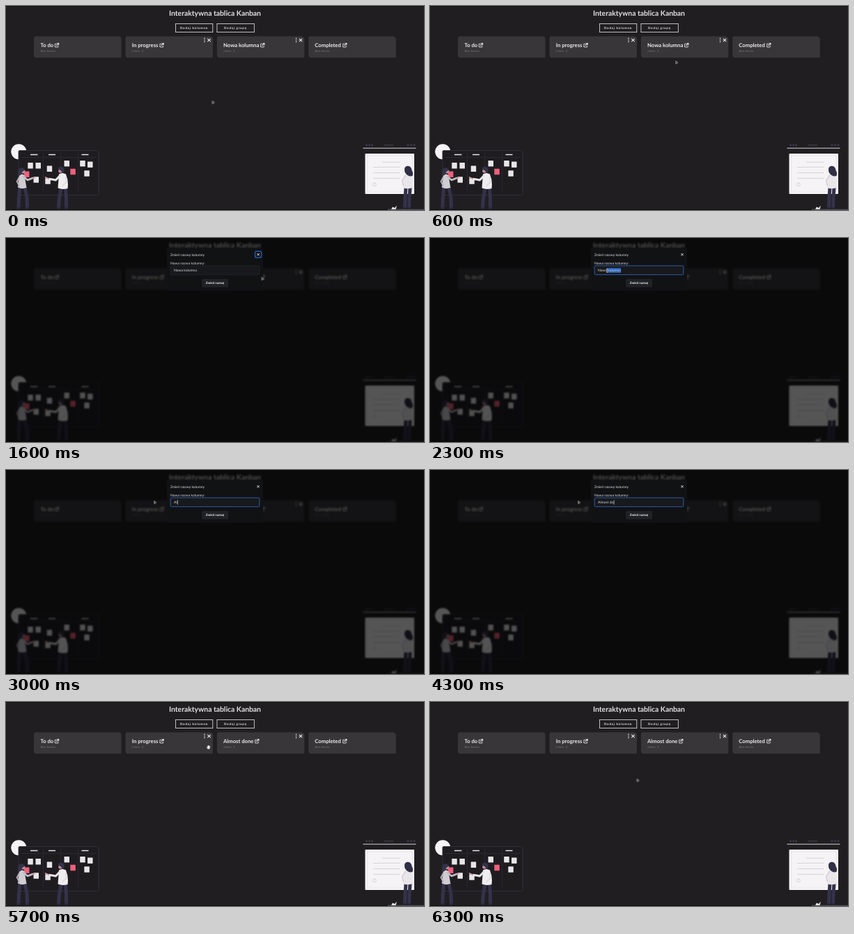
These frames come from a looping animation (600 px wide and 293 px high, 7 s). An HTML page:

```html
<!DOCTYPE html>
<html lang="pl">
<head>
<meta charset="utf-8">
<title>Tablica Kanban</title>
<style>
  html, body { margin: 0; width: 100%; height: 100%; overflow: hidden; background: #201e21; }
  svg { display: block; width: 100vw; height: 100vh; }
  text { font-family: Lato, "Open Sans", sans-serif; text-rendering: geometricPrecision; white-space: pre; }
  .title { font-size: 10.35px; font-weight: 700; fill: #e4e2e4; text-anchor: middle; }
  .add { font-size: 4.4px; font-weight: 700; letter-spacing: .8px; fill: #eee; }
  .name { font-size: 7.7px; font-weight: 700; fill: #eceaec; }
  .limit { font-size: 4px; font-style: italic; letter-spacing: .5px; fill: #858286; }
  .field { font-size: 5.03px; fill: #dcdde0; }
  .go { font-size: 4.5px; font-weight: 700; fill: #f4f4f5; text-anchor: middle; }

  .show { animation: 7s step-end infinite; visibility: hidden; }
  #page { animation: soften 7s step-end infinite; }
  #modal { animation-name: modal; }
  #ring { animation-name: ring; }
  #focus { animation-name: focus; }
  #pick { animation: pick 7s infinite; transform-origin: 274px 0; }
  #before { animation-name: before; }
  #after { animation-name: after; }
  #mouse { animation: path 7s infinite; }
  #arrow { animation-name: arrow; }
  #beam { animation-name: beam; }
  #hand { animation-name: hand; }
  #grab { animation-name: grab; }

  @keyframes soften { 0%, 81.42% { filter: none; } 22.85% { filter: blur(.8px); } }
  @keyframes modal { 0%, 81.42% { visibility: hidden; } 22.85% { visibility: visible; } }
  @keyframes ring { 0%, 30% { visibility: hidden; } 22.85% { visibility: visible; } }
  @keyframes focus { 0%, 81.42% { visibility: hidden; } 30% { visibility: visible; } }
  @keyframes before { 0% { visibility: visible; } 81.42%, 100% { visibility: hidden; } }
  @keyframes after { 0% { visibility: hidden; } 81.42%, 100% { visibility: visible; } }
  @keyframes pick {
    0% { transform: scaleX(0); animation-timing-function: step-end; }
    30% { transform: scaleX(0); animation-timing-function: steps(5, start); }
    37.14% { transform: scaleX(1); animation-timing-function: step-end; }
    41.42%, 100% { transform: scaleX(0); animation-timing-function: step-end; }
  }
  @keyframes path {
    0% { transform: translate(297.5px, 138.5px); animation-timing-function: step-end; }
    1.42% { transform: translate(297.5px, 138.5px); animation-timing-function: steps(8, start); }
    12.85% { transform: translate(373px, 62px); animation-timing-function: steps(5, start); }
    20% { transform: translate(370px, 59.5px); animation-timing-function: step-end; }
    22.85% { transform: translate(368.5px, 58.5px); animation-timing-function: step-end; }
    24.28% { transform: translate(368.5px, 58.5px); animation-timing-function: steps(3, start); }
    28.57% { transform: translate(278px, 47px); animation-timing-function: step-end; }
    30% { transform: translate(278px, 47px); animation-timing-function: steps(8, start); }
    41.42% { transform: translate(214px, 46.5px); animation-timing-function: step-end; }
    72.85% { transform: translate(214px, 46.5px); animation-timing-function: steps(5, start); }
    80% { transform: translate(292px, 66.5px); animation-timing-function: step-end; }
    81.42% { transform: translate(290.5px, 65px); animation-timing-function: step-end; }
    82.85% { transform: translate(290.5px, 65px); animation-timing-function: steps(6, start); }
    91.42%, 100% { transform: translate(298.5px, 112.5px); animation-timing-function: step-end; }
  }
  @keyframes arrow {
    0%, 22.85%, 37.14%, 82.85%, 100% { visibility: visible; }
    12.85%, 27.14%, 78.57% { visibility: hidden; }
  }
  @keyframes beam { 0%, 37.14% { visibility: hidden; } 27.14% { visibility: visible; } }
  @keyframes hand {
    0%, 22.85%, 81.42% { visibility: hidden; }
    12.85%, 78.57% { visibility: visible; }
  }
  @keyframes grab { 0%, 82.85% { visibility: hidden; } 81.42% { visibility: visible; } }
</style>
</head>
<body>
<svg viewBox="0 0 600 293" preserveAspectRatio="none">
  <defs>
    <path id="card" d="M3 43.5H121Q125.500 43.5 125.500 48V73Q125.500 74.200 124.300 74.200H4Q0 74.200 0 70.200V46.500Q0 43.500 3 43.500Z" fill="#383639"/>
    <g id="edit" fill="none" stroke="#dddbdd" stroke-width=".9">
      <path d="M3 1.300H.600V6H5.200V3.700"/>
      <path d="M2.300 4.200L5.600 .900M3.600 .600H5.900V2.900" stroke-width="1.100"/>
    </g>
    <g id="tools" fill="#eceaec">
      <circle cy="46.500" r=".8"/><circle cy="49" r=".8"/><circle cy="51.500" r=".8"/>
      <path d="M4.300 46.800L8.700 51.200M8.700 46.800L4.300 51.200" stroke="#eceaec" stroke-width="1.100"/>
    </g>
    <rect id="note" width="7.500" height="8.500" rx=".6"/>
  </defs>

  <rect width="600" height="293" fill="#201e21"/>
  <g id="page">
    <text class="title" x="300" y="14.300">Interaktywna tablica Kanban</text>
    <g fill="none" stroke="#e6e4e6" stroke-width=".8">
      <rect x="243.400" y="25.400" width="53.400" height="12.200"/>
      <rect x="302.900" y="25.400" width="53.400" height="12.200"/>
    </g>
    <text class="add" x="250" y="33">Dodaj kolumnę</text>
    <text class="add" x="313" y="33">Dodaj grupę</text>

    <use href="#card" x="40"/><use href="#card" x="171.400"/>
    <use href="#card" x="302.800"/><use href="#card" x="434.200"/>
    <use href="#tools" x="285"/><use href="#tools" x="416.500"/>
    <text class="name" x="49.500" y="59">To do</text><use href="#edit" x="69.700" y="53"/>
    <text class="name" x="180.800" y="59">In progress</text><use href="#edit" x="220.300" y="53"/>
    <g id="before" class="show">
      <text class="name" x="312" y="59">Nowa kolumna</text><use href="#edit" x="365" y="53"/>
    </g>
    <g id="after" class="show">
      <text class="name" x="312" y="59">Almost done</text><use href="#edit" x="357" y="53"/>
    </g>
    <text class="name" x="443.300" y="59">Completed</text><use href="#edit" x="483" y="53"/>
    <text class="limit" x="49.800" y="65.500">Bez limitu</text>
    <text class="limit" x="181" y="65.500">Limit: 4</text>
    <text class="limit" x="312.400" y="65.500">Limit: 3</text>
    <text class="limit" x="443.600" y="65.500">Bez limitu</text>

    <!-- board with two people -->
    <circle cx="18.300" cy="209.300" r="11" fill="#f6f4f6"/>
    <rect x="18" y="207.500" width="115" height="64" rx="1.500" fill="#1f1c20" stroke="#38353b" stroke-width=".8"/>
    <path d="M53.500 211V267M78.500 211V267M103.500 211V267M23 217.500H129" stroke="#343138" stroke-width=".6"/>
    <path d="M35 213.500H45.500M61 213.500H71M108.500 213.500H118.500" stroke="#e6e3e6" stroke-width="1.400"/>
    <g fill="#e8e5e8">
      <use href="#note" x="31.300" y="225"/><use href="#note" x="42.500" y="225"/>
      <use href="#note" x="39.500" y="245.300"/><use href="#note" x="58.700" y="229.500"/>
      <use href="#note" x="56.300" y="247.300"/><use href="#note" x="83.500" y="222"/>
      <use href="#note" x="106.200" y="222"/><use href="#note" x="117" y="223.500"/>
      <use href="#note" x="112.300" y="236.200"/>
    </g>
    <g fill="#ee5f7d">
      <use href="#note" x="26" y="237.500"/><use href="#note" x="92.300" y="233.800"/>
    </g>
    <g stroke-linecap="round" stroke-linejoin="round">
      <path d="M20 260L18.500 276L18 290M27 260L30 275L30.500 290" fill="none" stroke="#33324a" stroke-width="5"/>
      <path d="M17 290.500H20.500M30 290.500H33.500" stroke="#24222f" stroke-width="1.800"/>
      <path d="M19 243Q23 240 26.500 243L29.500 261Q23 263.500 17 260.500Z" fill="#cfccd2"/>
      <path d="M25 245L31 250L38.500 247" fill="none" stroke="#c3bfc7" stroke-width="2.600"/>
      <path d="M38.500 247L42 246" stroke="#c99a9c" stroke-width="1.500"/>
      <path d="M19 246L15.800 252L19 258" fill="none" stroke="#b8b4bd" stroke-width="2"/>
      <circle cx="24.700" cy="237.800" r="2.800" fill="#b98b8f"/>
      <path d="M26.500 234Q22 230.500 18.500 234.500Q16.800 238 17.300 243Q21 244.500 22.500 240Q24 236.500 26.500 236Z" fill="#34334c"/>

      <path d="M79 262L76.500 276L75.500 290M85.500 262L86.500 276L86.500 290" fill="none" stroke="#33324a" stroke-width="5"/>
      <path d="M73 290.700H76M84.500 290.700H88" stroke="#24222f" stroke-width="1.800"/>
      <path d="M76 241.500Q81 238.500 86 241.500Q90 251 88.500 262Q81 264 74.500 261.500Z" fill="#f0eef0"/>
      <path d="M77.500 243.500L71.500 250L63 248.500" fill="none" stroke="#e9e6e9" stroke-width="3"/>
      <path d="M61.500 248.300L56.500 246" stroke="#d6a1a3" stroke-width="1.500"/>
      <path d="M86 245L86.500 253L81 258" fill="none" stroke="#d8d5da" stroke-width="1.200"/>
      <circle cx="78.200" cy="236.800" r="3" fill="#b98b8f"/>
      <path d="M74.800 235Q75 230.500 79.500 230.800Q84.500 231.500 83.500 237Q83 240 80 240Q80.500 235.500 74.800 235Z" fill="#34334c"/>
    </g>

    <!-- browser panel with a person -->
    <g fill="#45435c">
      <circle cx="517.500" cy="199.800" r="1.200"/><circle cx="521.500" cy="199.800" r="1.200"/><circle cx="525.500" cy="199.800" r="1.200"/>
      <circle cx="577" cy="199.800" r="1.300"/><circle cx="581.500" cy="199.800" r="1.300"/><circle cx="586" cy="199.800" r="1.300"/>
    </g>
    <path d="M542 199.800H556" stroke="#49464f" stroke-width="1"/>
    <path d="M512.500 204.200H588.500" stroke="#d5d2d6" stroke-width="1"/>
    <rect x="515.500" y="212" width="70.500" height="58" rx="1" fill="#f5f3f5"/>
    <rect x="518.500" y="215" width="64.500" height="52" fill="none" stroke="#e2dfe3" stroke-width=".6"/>
    <path d="M540 224.300H566M527 231.500H565M527 239.500H565M527 247.500H565" stroke="#cfccd1" stroke-width=".8"/>
    <circle cx="529" cy="256.300" r="2.400" fill="none" stroke="#cfccd1" stroke-width=".8"/>
    <g stroke-linecap="round" stroke-linejoin="round">
      <path d="M574 261L573 276L572.500 289M580 261L579 276L578.500 289" fill="none" stroke="#33324a" stroke-width="5"/>
      <path d="M570 290.300H573M577 290.300H580" stroke="#24222f" stroke-width="1.800"/>
      <path d="M572 242.500Q577 239.500 581.500 243Q584 252 582.500 261.500Q576 263 570.500 261.500Z" fill="#e9e6ea"/>
      <path d="M573 244L569 250.500L570 257" fill="none" stroke="#d9d5db" stroke-width="2.200"/>
      <path d="M572 234Q573 229.500 577.500 229.800Q582 230.500 582.500 236Q585 240 583.500 244Q578 245.500 574 241Q571.500 238 572 234Z" fill="#302f45"/>
    </g>
    <path d="M553 292L555 288.500L558 290L561 286.500L559.500 292Z" fill="#eceaec"/>
    <path d="M548 292.300H600" stroke="#6a676c" stroke-width=".8"/>
    <path d="M0 292.500H548" stroke="#0d0c0e" stroke-width="1"/>
    <path d="M0 .500H600" stroke="#121113" stroke-width="1"/>
  </g>

  <g id="modal" class="show">
    <rect width="600" height="293" opacity=".65"/>
    <rect x="231" y="14.500" width="138" height="61" rx="2.500" fill="#111214"/>
    <text class="field" x="236" y="25.500">Zmień nazwę kolumny</text>
    <path d="M360.300 22L363.700 25.400M363.700 22L360.300 25.400" stroke="#eee" stroke-width=".9"/>
    <rect id="ring" class="show" x="357.500" y="19.200" width="9" height="9" rx="2" fill="none" stroke="#2468c4" stroke-width="1.200"/>
    <text class="field" x="236" y="37.700">Nowa nazwa kolumny:</text>
    <rect x="236" y="39.800" width="128" height="13" rx="1.200" fill="#18191c" stroke="#27292d" stroke-width=".6"/>
    <rect id="focus" class="show" x="236.200" y="39.900" width="127.600" height="12.800" rx="1.200" fill="none" stroke="#2a56a0" stroke-width="1"/>
    <rect id="pick" x="241" y="43" width="33" height="7" fill="#2b62b5"/>
    <text id="value" class="field" x="241" y="48.300"></text>
    <rect id="caret" y="43.300" width=".6" height="6.400" fill="#fff"/>
    <rect x="281" y="58.800" width="38" height="12" rx="2" fill="#212226"/>
    <text class="go" x="300" y="66.400">Zmień nazwę</text>
  </g>

  <g id="mouse">
    <path id="arrow" class="show" d="M-1.200 -2V2L1.700 .300Z" fill="#151416" stroke="#dad8da" stroke-width=".7" stroke-linejoin="round"/>
    <path id="beam" class="show" d="M-1 -2.500H1M0 -2.500V2.500M-1 2.500H1" fill="none" stroke="#ddd" stroke-width=".6"/>
    <g id="hand" class="show">
      <path d="M-1.500 -2.500V.600L-2.500 0L-1 2.500H1.500L2.200 -.200L-.500 -.800V-2.500Z" fill="#f2f2f4" stroke="#1b1b1f" stroke-width=".3"/>
      <circle cx="1" cy=".8" r="1.500" fill="none" stroke="#3f8fd6" stroke-width=".9"/>
    </g>
    <path id="grab" class="show" d="M-1.300 -1.800V.200L-2.600 -.300L-1 2.600H1.700L2.500 -1.300L1.600 -1.500L1.200 -2.500L.300 -2.700L-.500 -2.500Z" fill="#f6f6f7"/>
  </g>
</svg>
<script>
  const LOOP = 7000, PHRASE = 'Almost done';
  // moments at which the typed text grows, with its new length
  const keys = [[2900, 1], [3000, 2], [3300, 3], [3500, 5], [3700, 6], [3800, 7],
                [4200, 8], [4300, 9], [4500, 10], [4700, 11]];
  const value = document.getElementById('value');
  const caret = document.getElementById('caret');
  let start;

  function draw(now) {
    start ??= now;
    const t = (now - start) % LOOP;
    const key = keys.findLast(([at]) => t >= at);
    const text = key ? PHRASE.slice(0, key[1]) : 'Nowa kolumna';
    if (value.textContent !== text) value.textContent = text;
    const typing = key && t < 5100;
    caret.setAttribute('opacity', typing ? 1 : 0);
    if (typing) caret.setAttribute('x', 241.3 + value.getComputedTextLength());
    requestAnimationFrame(draw);
  }
  requestAnimationFrame(draw);
</script>
</body>
</html>
```
